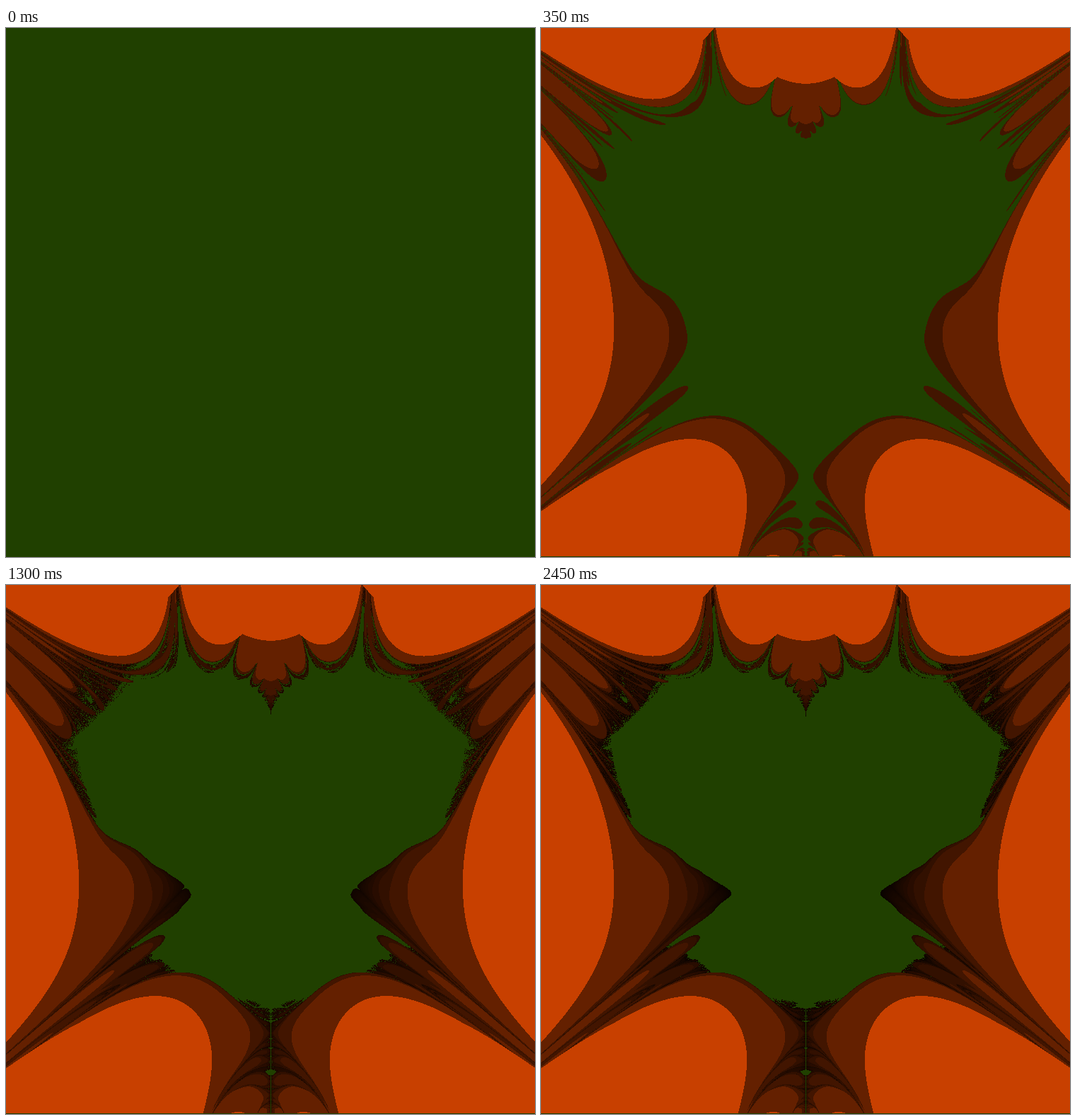
These frames come from a looping animation (748x748 px, 2.5 s). An HTML page with a canvas:

```html
<!DOCTYPE html>
<html lang="en">
<head>
<meta charset="utf-8">
<title>Escape-time fractal</title>
<style>
  html, body { margin: 0; width: 100%; height: 100%; overflow: hidden; background: #204000; }
  canvas { display: block; width: 748px; height: 748px; }
</style>
</head>
<body>
<canvas id="stage" width="748" height="748"></canvas>
<script>
const SIZE = 748, STEPS = 48, LOOP = 2500, TICK = 50;
const ctx = document.getElementById('stage').getContext('2d');
const image = ctx.createImageData(SIZE, SIZE);
const pixels = new Uint32Array(image.data.buffer);

const rgb = (r, g, b) => (255 << 24 | b << 16 | g << 8 | r) >>> 0;
const INSIDE = rgb(32, 64, 0);

// Two neighbouring steps share one shade.
const shades = Array.from({ length: STEPS + 1 }, (_, s) => {
  const k = Math.max(1, Math.ceil(s / 2));
  return rgb(Math.floor(200 / k), Math.floor(64 / k), 0);
});

// Quadratic map whose y update already uses the new x.
function escapeStep(a, b) {
  let x = a, y = b;
  for (let s = 1; s <= STEPS; s++) {
    x = x * x - y * y + a;
    y = 2 * x * y + b;
    if (x > 2 || x < -2 || y > 2 || y < -2) return s;
  }
  return STEPS + 1;
}

// The real axis runs upwards; the last row stays plain.
const escapes = new Uint8Array(SIZE * SIZE).fill(STEPS + 1);
for (let row = 0; row < SIZE - 1; row++) {
  const a = 1 - 3 * (row + 1) / SIZE;
  for (let col = 0; col < SIZE; col++) {
    escapes[row * SIZE + col] = escapeStep(a, 2.5 * (col - SIZE / 2) / SIZE);
  }
}

let shown = -1;

function draw(step) {
  for (let i = 0; i < pixels.length; i++) {
    pixels[i] = escapes[i] <= step ? shades[escapes[i]] : INSIDE;
  }
  ctx.putImageData(image, 0, 0);
  shown = step;
}

function tick() {
  const t = performance.now() % LOOP;
  const step = Math.max(0, Math.floor(t / TICK) - 1);
  if (step !== shown) draw(step);
  requestAnimationFrame(tick);
}
tick();
</script>
</body>
</html>
```
